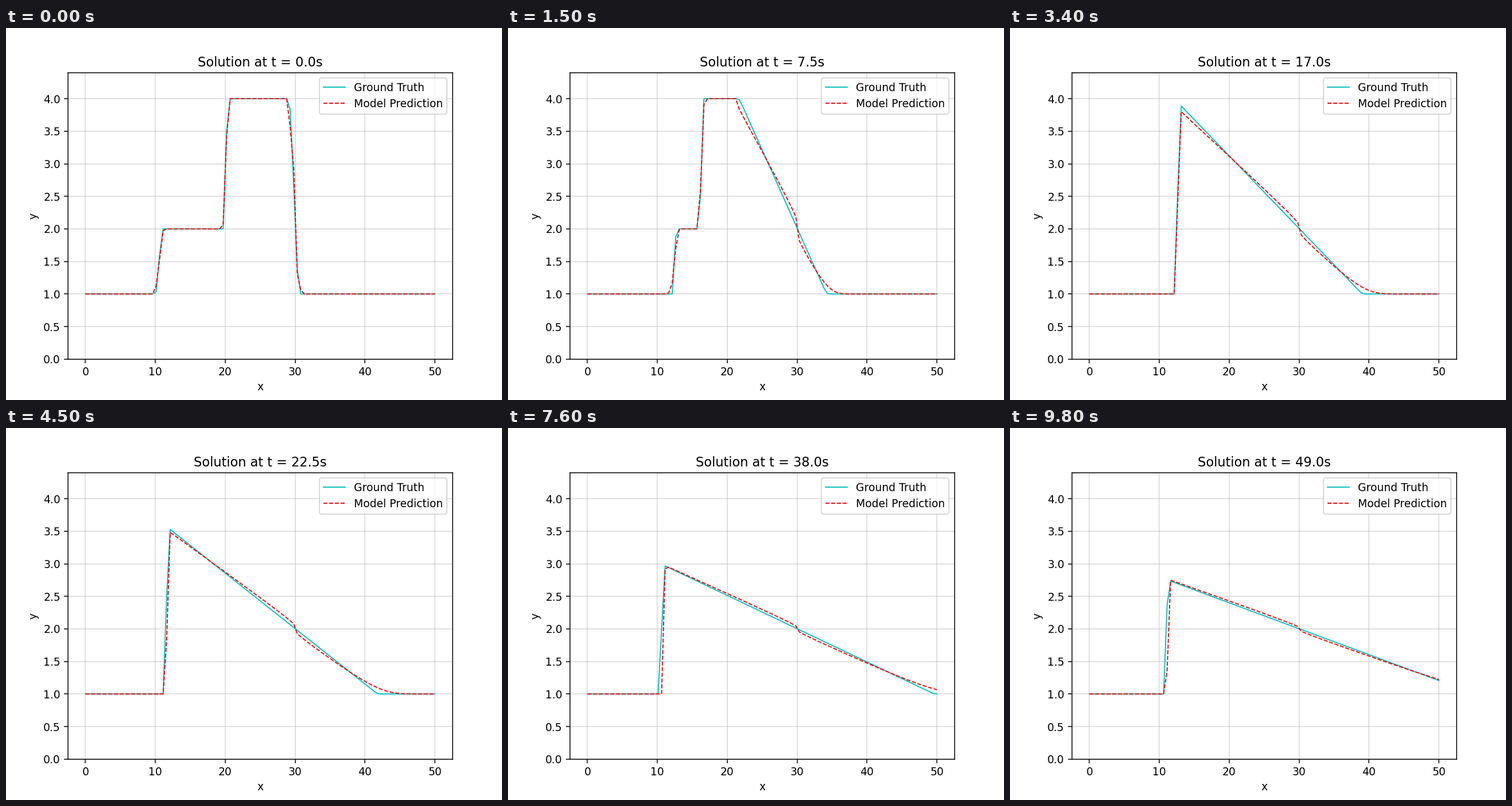
Recreate the animation shown at these times as a matplotlib script. Size 864 by 648 pixels, loop 9900 ms.

```python
import numpy as np
import matplotlib.pyplot as plt
from matplotlib.animation import FuncAnimation

CELLS = 100
FRAMES = 99
SUB = 200  # sample points per cell for averaging

# Positions are in cells and times in steps; flux is u * (1 - u / 4).
JUMP_LOW, JUMP_HIGH, FAN = 21.0, 41.0, 60.0
GAP = 1.24  # initial width of the 1.5 state between 1 and 2
T_MERGE = (JUMP_HIGH - JUMP_LOW) / 0.75
X_MERGE = JUMP_LOW + 0.25 * T_MERGE
T_FAN = (FAN - X_MERGE - 0.25 * T_MERGE) / 0.75

POINTS = (np.arange(CELLS * SUB) + 0.5) / SUB


def exact(t):
    """Cell averages of the exact solution at time t."""
    u = np.clip(2 - 2 * (POINTS - FAN) / t, 1, 4)
    if t < T_MERGE:
        low = JUMP_LOW + 0.25 * t
        half = max(0.0, GAP - 0.25 * t) / 2
        u[POINTS < JUMP_HIGH - 0.5 * t] = 2
        u[POINTS < low + half] = 1.5
        front = low - half
    elif t < T_FAN:
        front = X_MERGE - 0.25 * (t - T_MERGE)
    else:
        front = FAN + t / 2 - 1.5 * np.sqrt(T_FAN * t)
    u[POINTS < front] = 1
    return u.reshape(CELLS, SUB).mean(axis=1)


def flux(u):
    return u * (1 - u / 4)


def godunov_step(u):
    """One first-order step with equal time and space increments."""
    padded = np.concatenate(([1.0], u, u[-1:]))
    demand = flux(np.minimum(padded[:-1], 2))
    supply = flux(np.maximum(padded[1:], 2))
    flow = np.minimum(demand, supply)
    return u + flow[:-1] - flow[1:]


truth = [exact(i + 1.5) for i in range(FRAMES)]
model = []
state = exact(0.5)
for _ in range(FRAMES):
    state = godunov_step(state)
    model.append(state)

x = np.linspace(0, 50, CELLS)
fig, ax = plt.subplots(figsize=(6.4, 4.8), dpi=135)
truth_line, = ax.plot(x, truth[0], "c-", lw=1, label="Ground Truth")
model_line, = ax.plot(x, model[0], "r--", lw=1, label="Model Prediction")
ax.set_xlim(-2.5, 52.5)
ax.set_ylim(0, 4.4)
ax.set_xlabel("x")
ax.set_ylabel("y")
ax.grid(alpha=0.5)
ax.legend(loc="upper right")
title = ax.set_title("Solution at t = 0.0s")


def update(i):
    truth_line.set_ydata(truth[i])
    model_line.set_ydata(model[i])
    title.set_text(f"Solution at t = {i * 0.5:.1f}s")
    return truth_line, model_line, title


anim = FuncAnimation(fig, update, frames=FRAMES, interval=100, repeat=True)
plt.show()
```
